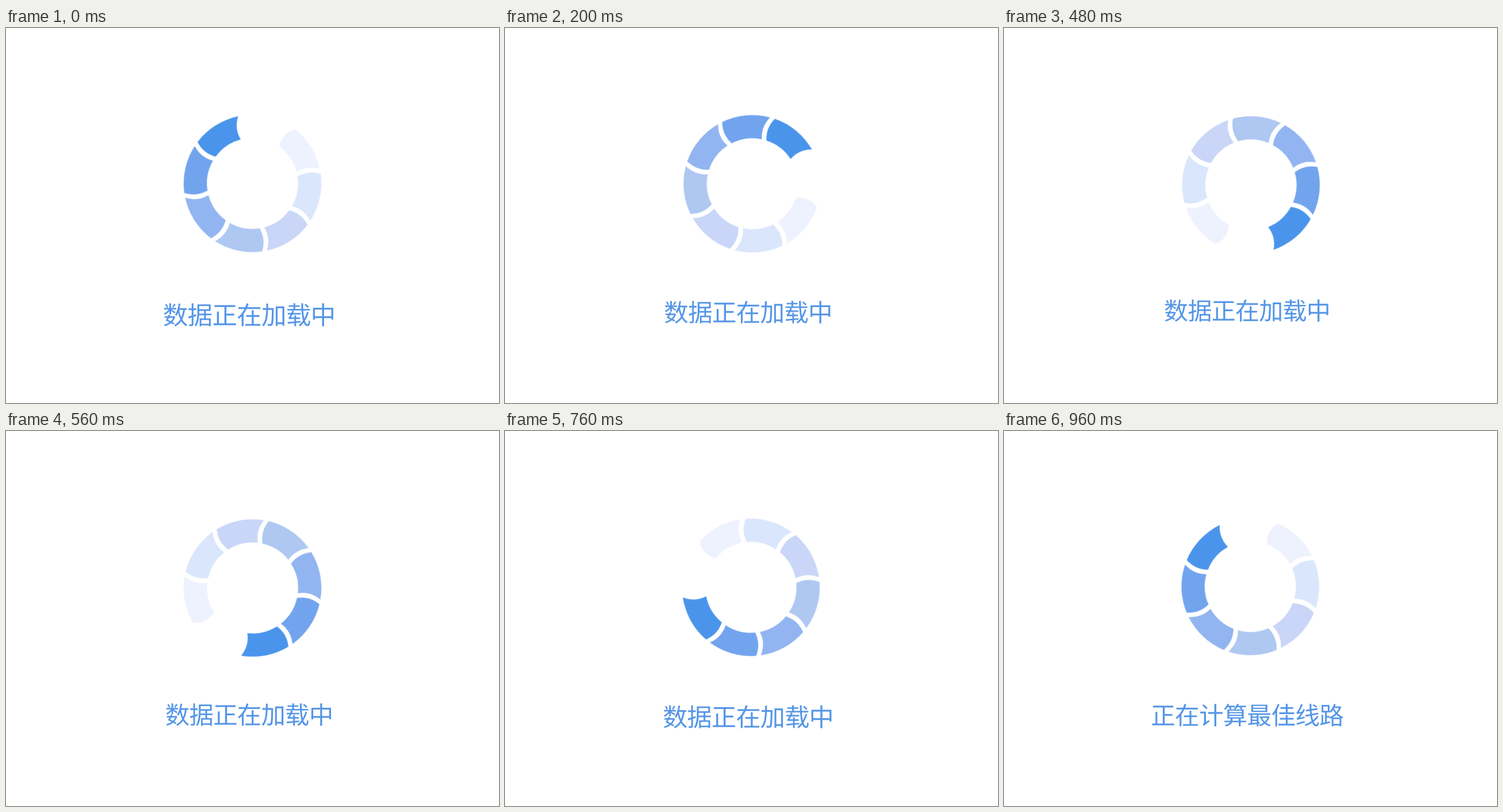
Recreate the animation shown at these times as an HTML page. Size 857 px wide and 653 px high, loop 1 s.

```html
<!DOCTYPE html>
<html lang="zh-CN">
<head>
<meta charset="utf-8">
<title>数据正在加载中</title>
<style>
  html, body { margin: 0; width: 100%; height: 100%; overflow: hidden; background: #fff; }
  svg { display: block; width: 857px; height: 653px; }
  text {
    font: 300 43.6px "Noto Sans CJK SC", "Noto Sans CJK", "Noto Sans SC", sans-serif;
    letter-spacing: -0.8px;
    text-anchor: middle;
    text-rendering: geometricPrecision;
    fill: #5596e7;
  }
</style>
</head>
<body>
<svg viewBox="0 0 857 653">
  <g transform="translate(428.8 272)"><g id="ring"></g></g>
  <g transform="translate(422.6 300)">
    <text id="loading" y="216">数据正在加载中</text>
    <text id="routing" y="216" opacity="0">正在计算最佳线路</text>
  </g>
</svg>
<script>
  const LOOP = 1000, STEPS = 25;
  const OUTER = 119.7, INNER = 79.2, PITCH = 45, BOW = 50;
  const COLORS = ['#4a95eb', '#72a4ee', '#92b5f1', '#aec8f1', '#c9d6f8', '#dae6fb', '#eef2fe'];
  const ring = document.getElementById('ring');
  const loading = document.getElementById('loading');
  const routing = document.getElementById('routing');

  // Point at a clockwise angle from the top; the ring sits slightly off its pivot.
  function polar(r, deg) {
    const a = deg * Math.PI / 180;
    return (r * Math.sin(a)).toFixed(2) + ' ' + (-1.4 - r * Math.cos(a)).toFixed(2);
  }

  COLORS.forEach((color, i) => {
    const last = i === COLORS.length - 1;
    const head = -PITCH * i;
    const tail = head - (last ? 39.8 : 41);
    const bow = last ? 36 : BOW;
    const path = document.createElementNS('http://www.w3.org/2000/svg', 'path');
    path.setAttribute('fill', color);
    path.setAttribute('d',
      `M${polar(OUTER, head)}` +
      `A${OUTER} ${OUTER} 0 0 0 ${polar(OUTER, tail)}` +
      `A${bow} ${bow} 0 0 0 ${polar(INNER, head - 42)}` +
      `A${INNER} ${INNER} 0 0 1 ${polar(INNER, head - 3)}` +
      `A${BOW} ${BOW} 0 0 1 ${polar(OUTER, head)}Z`);
    ring.append(path);
  });

  function play(el, frames) {
    el.animate(frames, { duration: LOOP, iterations: Infinity, easing: `steps(${STEPS})` })
      .startTime = 0;
  }

  // Time in ms and size of the pulsing caption.
  const pulse = [
    [0, 1], [200, 0.9764], [320, 0.9625], [360, 0.9596], [400, 0.9585], [440, 0.9605],
    [560, 0.973], [680, 0.9865], [840, 0.9955], [920, 1], [1000, 1]
  ];
  const swap = 0.95;

  play(ring, [{ transform: 'rotate(-12deg)' }, { transform: 'rotate(348deg)' }]);
  play(loading, pulse.map(([t, s]) => ({ offset: t / LOOP, transform: `scale(${s})` })));
  play(loading, [
    { offset: 0, opacity: 1 }, { offset: swap, opacity: 1 },
    { offset: swap, opacity: 0 }, { offset: 1, opacity: 0 }
  ]);
  play(routing, [
    { offset: 0, opacity: 0 }, { offset: swap, opacity: 0 },
    { offset: swap, opacity: 1 }, { offset: 1, opacity: 1 }
  ]);
  routing.style.transform = 'scale(0.978)';
</script>
</body>
</html>
```
